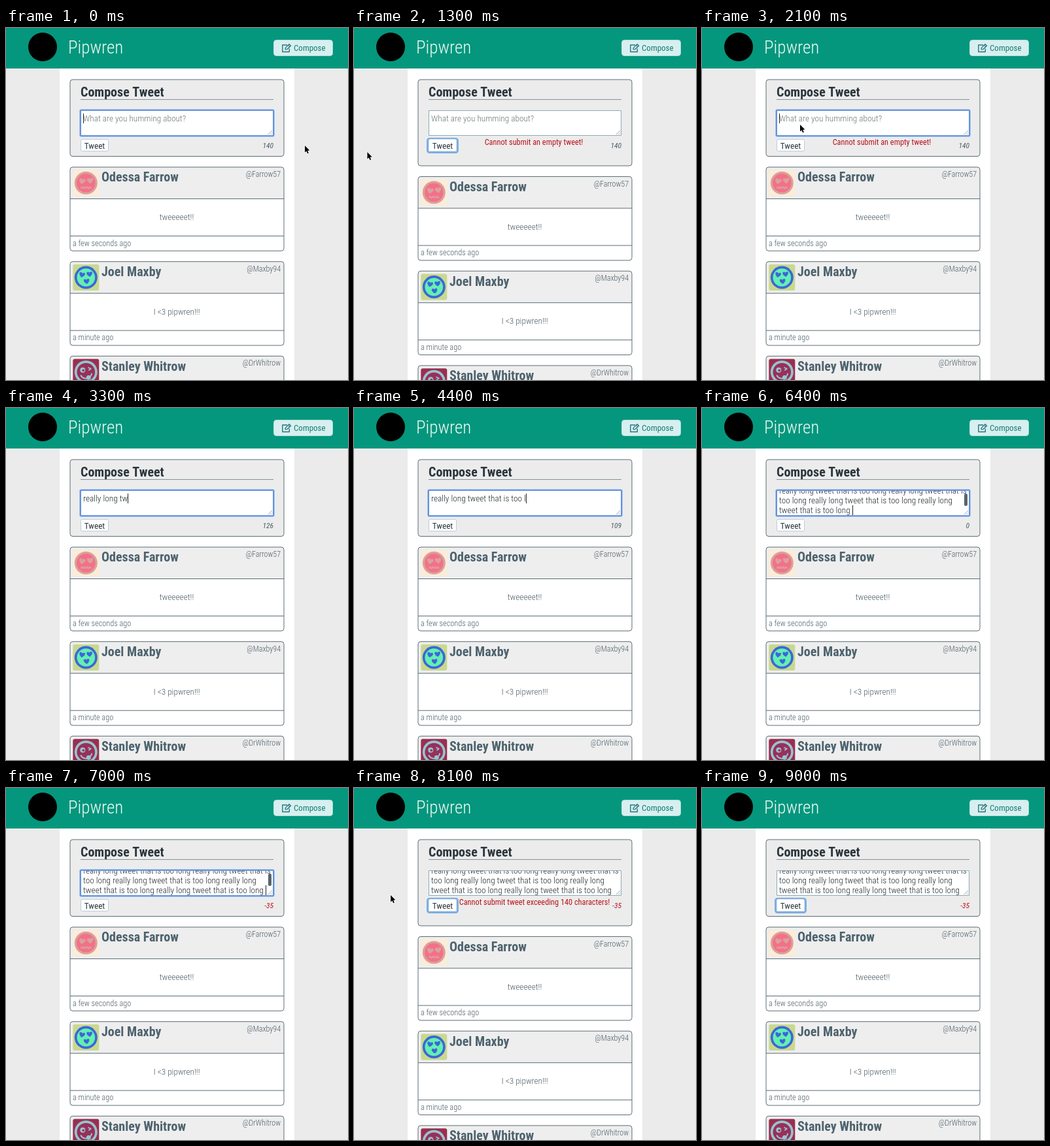
Animation, 523 px wide and 539 px high, one loop 9.1 s. Source, as an HTML page with a canvas:

```html
<!DOCTYPE html>
<html lang="en">
<head>
<meta charset="utf-8">
<title>Pipwren</title>
<style>
html, body { margin: 0; width: 100%; height: 100%; overflow: hidden; background: #ebebeb; }
canvas { display: block; width: 523px; height: 539px; }
</style>
</head>
<body>
<canvas id="stage"></canvas>
<script>
const W = 523, H = 539, LOOP = 9100, STEP = 100;
const canvas = document.getElementById('stage');
const ctx = canvas.getContext('2d');
const dpr = window.devicePixelRatio || 1;
canvas.width = W * dpr;
canvas.height = H * dpr;

const INK = '#4b5d67', DARK = '#2b363c', LINE = '#5d6c74', RED = '#b8131b';
const PHRASE = 'really long tweet that is too long ';
const CARDS = [
  { name: 'Odessa Farrow', handle: '@Farrow57', body: 'tweeeeet!!', age: 'a few seconds ago', face: loveFace },
  { name: 'Joel Maxby', handle: '@Maxby94', body: 'I <3 pipwren!!!', age: 'a minute ago', face: heartFace },
  { name: 'Stanley Whitrow', handle: '@DrWhitrow', body: '', age: '', face: winkFace }
];
// Validation messages: slide down at "on", slide up at "off"
const ERRORS = [
  { on: 500, off: 1900, text: 'Cannot submit an empty tweet!' },
  { on: 7500, off: 8500, text: 'Cannot submit tweet exceeding 140 characters!' }
];
// Pointer path: time, x, y
const PATH_A = [[0, 457, 180], [100, 457, 180], [500, 137, 181], [600, 137, 181], [900, 11, 188],
  [1100, 20, 190], [1600, 21, 190], [2100, 150, 148], [2400, 150, 148]];
const PATH_B = [[7100, 150, 148], [7400, 138, 181], [7600, 138, 181], [8000, 56, 164], [8900, 56, 164]];

const clamp = v => Math.max(0, Math.min(1, v));
const swing = v => 0.5 - Math.cos(Math.PI * clamp(v)) / 2;

function box(x, y, w, h, r, fill, stroke, lw = 1) {
  ctx.beginPath();
  ctx.roundRect(x, y, w, h, r);
  if (fill) { ctx.fillStyle = fill; ctx.fill(); }
  if (stroke) { ctx.strokeStyle = stroke; ctx.lineWidth = lw; ctx.stroke(); }
}

function line(points, color, lw = 1) {
  ctx.beginPath();
  points.forEach(([x, y]) => ctx.lineTo(x, y));
  ctx.strokeStyle = color;
  ctx.lineWidth = lw;
  ctx.stroke();
}

function disc(x, y, r, fill) {
  ctx.beginPath();
  ctx.arc(x, y, r, 0, 7);
  ctx.fillStyle = fill;
  ctx.fill();
}

function setFont(style, size) {
  ctx.font = `${style} condensed ${size}px "Roboto Condensed", Roboto, sans-serif`;
}

function text(s, x, y, style, size, color, align = 'left') {
  setFont(style, size);
  ctx.textAlign = align;
  ctx.fillStyle = color;
  ctx.fillText(s, x, y);
}

function heart(x, y, s, color, turn = 0) {
  ctx.save();
  ctx.translate(x, y);
  ctx.rotate(turn);
  ctx.scale(s, s);
  ctx.beginPath();
  ctx.moveTo(0, 1);
  ctx.bezierCurveTo(-1.9, -0.3, -0.9, -1.6, 0, -0.6);
  ctx.bezierCurveTo(0.9, -1.6, 1.9, -0.3, 0, 1);
  ctx.fillStyle = color;
  ctx.fill();
  ctx.restore();
}

function head(bg, ring, skin, inner) {
  box(0, 0, 40, 40, 3, bg);
  disc(20, 20, 17.5, ring);
  disc(20, 20, inner, skin);
}

function loveFace() {
  const tan = '#d8a29a';
  head('#fcecd8', tan, '#f4708a', 14.3);
  heart(14.2, 17.5, 4.4, tan, 0.25);
  heart(26.5, 16.5, 4.4, tan, -0.1);
  const zig = [];
  for (let i = 0; i < 9; i++) zig.push([12 + i * 2, 27.2 + (i % 2 ? -1.5 : 1.5)]);
  line(zig, tan, 1.6);
}

function heartFace() {
  const blue = '#3f66d8';
  head('#c8d98f', blue, '#62f0b2', 13.8);
  heart(14, 16, 4, blue, 0.2);
  heart(25.5, 15, 4, blue, -0.1);
  heart(21, 26, 4, blue, -0.1);
}

function winkFace() {
  const wine = '#98305a', ice = '#96c4cf';
  head('#9a2f50', ice, wine, 13.8);
  disc(15, 17, 4, ice);
  disc(16, 17.5, 1.8, wine);
  line([[23, 13], [27.5, 15], [24, 17.5]], ice, 1.8);
  ctx.beginPath();
  ctx.arc(20, 21, 9, 0.1, 2.7);
  ctx.strokeStyle = ice;
  ctx.lineWidth = 2;
  ctx.stroke();
  disc(24, 28.5, 3.5, ice);
}

function header() {
  ctx.fillStyle = '#04977d';
  ctx.fillRect(0, 0, W, 62);
  disc(56, 29, 22, '#000');
  text('Pipwren', 95, 39, '300', 27, '#effaf7');
  box(409.5, 18.5, 90, 24, 4, '#d8eff0', '#b5dedb');
  const teal = '#28757a';
  ctx.lineJoin = 'round';
  line([[430, 26], [422.8, 26], [422.8, 36.5], [433.3, 36.5], [433.3, 31.5]], teal, 1.4);
  line([[427, 32.8], [427.4, 30.4], [433, 24.7], [435.6, 27.2], [429.8, 32.6], [427, 32.8]], teal, 1.3);
  line([[431.5, 26.3], [434, 28.8]], teal, 1.1);
  text('Compose', 440, 35, '400', 13, '#13806f');
}

function wrap(s, width) {
  const lines = [''];
  for (const word of s.match(/\S+ ?/g) || []) {
    const last = lines.length - 1;
    if (ctx.measureText((lines[last] + word).trimEnd()).width > width) lines.push(word);
    else lines[last] += word;
  }
  return lines;
}

function draft(t) {
  if (t < 2400) return '';
  if (t < 5700) return PHRASE.slice(0, Math.floor((t - 2400) / 64));
  return PHRASE.repeat(Math.min(5, 1 + Math.floor((t - 5700) / 200)));
}

function textarea(t, value, focused) {
  if (focused) {
    box(113.5, 125.5, 296, 40, 2, null, '#a9c9f2', 3);
    box(114, 126, 295, 39, 1, '#fff', '#4a7fd6', 1.6);
  } else box(114.5, 126.5, 294, 38, 0, '#fff', '#8fa9b4');

  ctx.save();
  ctx.beginPath();
  ctx.rect(115, 127, 293, 37);
  ctx.clip();
  setFont('300', 13.3);
  const lines = wrap(value, 289);
  const rows = lines.length;
  const scroll = rows > 2 ? 142.5 + (rows - 1) * 14.8 - 160.5 : 0;
  const end = 118 + ctx.measureText(lines[rows - 1]).width;
  if (t >= 5100 && t < 5700) {
    ctx.fillStyle = '#dcaaf0';
    ctx.fillRect(118, 130, end - 118, 16);
  }
  if (value) lines.forEach((s, i) => text(s, 118, 142.5 + i * 14.8 - scroll, '300', 13.3, '#20282d'));
  else text('What are you humming about?', 118, 142.5, '300', 13.3, '#6c7478');
  const selecting = t >= 5100 && t < 5700;
  if (focused && !selecting) {
    const y = 131 + (rows - 1) * 14.8 - scroll;
    ctx.fillStyle = '#222';
    ctx.fillRect(Math.round(end), y, 1, 15);
  }
  if (focused && rows > 2) box(401, 131, 5, 19, 2.5, '#58656d');
  line([[401, 163], [407, 157]], '#8b9298', 0.8);
  line([[404.5, 163], [407, 160.5]], '#8b9298', 0.8);
  ctx.restore();
}

function composer(t, shift, error, open) {
  const value = draft(t);
  const left = 140 - value.length;
  const focused = t < 500 || (t >= 2100 && t < 7500);
  box(98, 79, 327, 117.5 + shift, 4, '#ececec', LINE);
  text('Compose Tweet', 114, 105, '700', 20, DARK);
  line([[114, 109.5], [409, 109.5]], '#83929a');
  textarea(t, value, focused);
  if (!focused) box(112.5, 169.5, 46, 21, 3, null, '#7eaee0', 3);
  box(114.5, 170.5, 42, 18, 2, '#fff', focused ? '#b9cddc' : '#dbe8f4');
  text('Tweet', 135.5, 184.5, '400', 13.3, DARK, 'center');
  text(left, 409, 183.5, 'italic 400', 11.5, left < 0 ? RED : INK, 'right');
  if (error) {
    ctx.save();
    ctx.beginPath();
    ctx.rect(157, 165, 240, 33.5 * open);
    ctx.clip();
    text(error.text, left < 0 ? 276 : 275, 179, '400', 12.3, RED, 'center');
    ctx.restore();
  }
}

function card(c, y) {
  box(98, y, 327, 128.3, 4, '#fff');
  box(98, y, 327, 48.5, [4, 4, 0, 0], '#eee');
  line([[98, y + 48.5], [425, y + 48.5]], LINE);
  line([[98, y + 105.5], [425, y + 105.5]], LINE);
  box(98, y, 327, 128.3, 4, null, LINE);
  ctx.save();
  ctx.translate(102.3, y + 4.3);
  c.face();
  ctx.restore();
  text(c.name, 146, y + 22.3, '700', 20, '#4d636e');
  text(c.handle, 420, y + 15, '300', 12, INK, 'right');
  text(c.body, 261, y + 81, '300', 13.3, INK, 'center');
  text(c.age, 102, y + 120.5, '300', 12.3, INK);
}

function pointer(t) {
  const path = [PATH_A, PATH_B].find(p => t >= p[0][0] && t < p[p.length - 1][0]);
  if (!path) return;
  const i = path.findIndex(p => p[0] > t);
  const [t0, x0, y0] = path[i - 1], [t1, x1, y1] = path[i];
  const k = swing((t - t0) / (t1 - t0));
  ctx.save();
  ctx.translate(x0 + (x1 - x0) * k, y0 + (y1 - y0) * k);
  ctx.beginPath();
  for (const [x, y] of [[0, 0], [0, 10.5], [2.4, 8.4], [4.1, 12.2], [5.8, 11.4], [4.2, 7.8], [7.4, 7.6]]) ctx.lineTo(x, y);
  ctx.closePath();
  ctx.lineJoin = 'round';
  ctx.strokeStyle = '#fff';
  ctx.lineWidth = 1.6;
  ctx.stroke();
  ctx.fillStyle = '#000';
  ctx.fill();
  ctx.restore();
}

function draw(now) {
  const t = Math.floor((now % LOOP) / STEP) * STEP;
  const error = ERRORS.find(e => t >= e.on && t < e.off + 400);
  const open = error ? swing((t - error.on) / 400) - swing((t - error.off) / 400) : 0;
  const shift = Math.max(0, 33.5 * open - 19);
  ctx.setTransform(dpr, 0, 0, dpr, 0, 0);
  ctx.fillStyle = '#ebebeb';
  ctx.fillRect(0, 0, W, H);
  ctx.fillStyle = '#fff';
  ctx.fillRect(82, 62, 359, H - 62);
  header();
  composer(t, shift, error, open);
  CARDS.forEach((c, i) => card(c, 213 + i * 144.7 + shift));
  pointer(t);
}

const start = performance.now();
function tick() {
  draw(performance.now() - start);
  requestAnimationFrame(tick);
}
tick();
</script>
</body>
</html>
```
